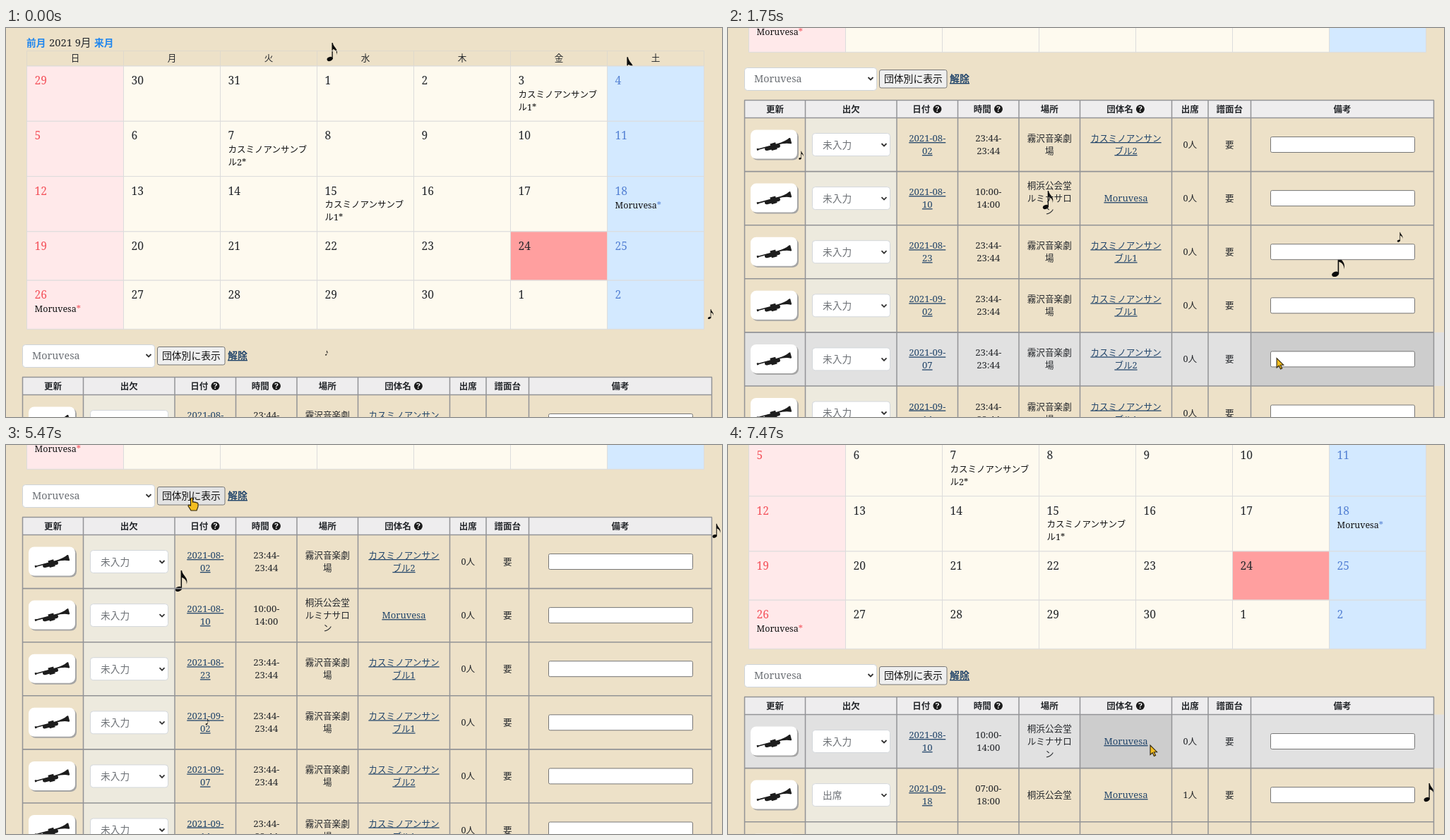
Recreate the animation shown at these times as an HTML page. Size 1014 by 552 pixels, loop 7.54 s.

```html
<!DOCTYPE html>
<html lang="ja">
<head>
<meta charset="utf-8">
<title>Calendar</title>
<style>
html, body { margin: 0; width: 100%; height: 100%; overflow: hidden; background: #ede1c8; }
svg { display: block; position: absolute; left: 0; top: 0; }
text { font-family: "Noto Serif", "Noto Sans CJK JP", "Noto Sans CJK", serif; white-space: pre; }
</style>
</head>
<body>
<svg id="stage" width="1014" height="552" viewBox="0 0 1014 552"></svg>
<script>
const LOOP = 7540, RELOAD = 5670;
const INK = '#24272b', LINK = '#23466b', LINE = '#929396', SOFT = '#6d7176';
const BAND = 'Moruvesa', ORCH = 'カスミノアンサンブル', HALL = ['霧沢音楽劇', '場'];
const SALON = ['桐浜公会堂', 'ルミナサロ', 'ン'];

function el(parent, tag, attrs, text) {
  const node = document.createElementNS('http://www.w3.org/2000/svg', tag);
  for (const k in attrs) node.setAttribute(k, attrs[k]);
  if (text !== undefined) node.textContent = text;
  parent.appendChild(node);
  return node;
}
const group = (p, attrs) => el(p, 'g', attrs);
const box = (p, x, y, width, height, fill, more) => el(p, 'rect', { x, y, width, height, fill, ...more });
const line = (p, x1, y1, x2, y2, stroke, w = 1) =>
  el(p, 'line', { x1, y1, x2, y2, stroke, 'stroke-width': w });
const path = (p, d, more) => el(p, 'path', { d, ...more });
function label(p, x, y, s, size, more) {
  const cjk = /[^\x00-\x7f]/.test(s);
  const type = cjk ? { 'font-size': size, 'font-weight': 500 } : { 'font-size': size * 1.04 };
  return el(p, 'text', { x, y, fill: INK, ...type, ...more }, s);
}
const MID = { 'text-anchor': 'middle' };
const UNDER = { fill: LINK, 'text-decoration': 'underline' };
const BOLD = { 'font-weight': 700 };
const LIGHT = { fill: SOFT, 'font-weight': 300 };

const stage = document.getElementById('stage');
const noteLayer = group(stage);
const page = group(stage);

// Calendar: weeks with events are taller
const DAY = 137;
const calX = i => 29.5 + DAY * i;
const calY = i => 54 + 78.3 * Math.min(i, 3) + 69.2 * Math.max(i - 3, 0);
const events = { 5: ORCH + '1', 9: ORCH + '2', 17: ORCH + '1', 20: BAND, 28: BAND };
const days = [];

label(page, 29, 26, '前月', 13.7, { ...BOLD, fill: '#1f86ee' });
label(page, 61, 26, '2021 9月', 14.7);
label(page, 125, 26, '来月', 13.7, { ...BOLD, fill: '#1f86ee' });
[...'日月火水木金土'].forEach((d, i) => {
  box(page, calX(i), 32.5, DAY, 21.5, 'none', { stroke: '#dfd9cc' });
  label(page, calX(i) + DAY / 2, 47, d, 12.6, MID);
});
for (let i = 0; i < 35; i++) {
  const col = i % 7, row = Math.floor(i / 7), x = calX(col), y = calY(row), h = calY(row + 1) - y;
  const fill = i === 26 ? '#ff9f9f' : col === 0 ? '#ffe9ea' : col === 6 ? '#d3e9ff' : '#fefaef';
  const ink = col === 0 ? '#f4525b' : col === 6 ? '#5481d4' : INK;
  days.push({ fill, x, y, h, rect: box(page, x, y, DAY, h, fill, { stroke: '#dcdcdc' }) });
  label(page, x + 11, y + 26, String(i < 3 ? 29 + i : (i - 3) % 30 + 1), 15, { fill: ink });
  const ev = events[i];
  if (ev === BAND) {
    el(label(page, x + 11, y + 45, ev, 12, { fill: '#111' }), 'tspan', { fill: ink }, '*');
  } else if (ev) {
    [ev.slice(0, 9), ev.slice(9) + '*'].forEach((s, k) =>
      label(page, x + 11, y + 44.5 + 18 * k, s, 12.5, { fill: '#111' }));
  }
}

// Controls
const chevron = (p, x, y) => path(p, `M${x - 3.5} ${y - 2}l3.5 3.5l3.5-3.5`,
  { fill: 'none', stroke: '#333', 'stroke-width': 1.8 });
const ring = box(page, 21.5, 447.5, 190.5, 36, 'none', { rx: 5, stroke: '#a9cdea', 'stroke-width': 3 });
const select = box(page, 23.5, 449.5, 187, 32, '#fff', { rx: 4, stroke: '#ced4da' });
label(page, 37, 470, BAND, 13.7, LIGHT);
chevron(page, 202, 465);
const button = box(page, 214.5, 452.5, 95.5, 25.5, '#efefef', { rx: 2.5, stroke: '#767676' });
label(page, 221, 469.5, '団体別に表示', 13.8, { fill: '#111', 'font-weight': 400 });
label(page, 314, 470, '解除', 14, { ...UNDER, ...BOLD });

// Table
const colX = [23.5, 109.5, 239, 325.5, 412, 498.5, 628.5, 680, 740.5, 999.5];
const mid = i => (colX[i] + colX[i + 1]) / 2;
const HEAD = 495.5, TOP = 520.5, ROW = 76.1;
const late = ['23:44-', '23:44'], early = ['10:00-', '14:00'];
const orch = n => [ORCH.slice(0, 8), ORCH.slice(8) + n];
const entry = (day, hours, hall, who, count = '0人', state = '未入力') =>
  ({ day, hours, hall, who, count, state });
const allRows = [
  entry('08-02', late, HALL, orch(2)),
  entry('08-10', early, SALON, [BAND]),
  entry('08-23', late, HALL, orch(1)),
  entry('09-02', late, HALL, orch(1)),
  entry('09-07', late, HALL, orch(2)),
  entry('09-14', late, HALL, orch(1))
];
const bandRows = [
  allRows[1],
  entry('09-18', ['07:00-', '18:00'], [SALON[0]], [BAND], '1人', '出席'),
  entry('09-26', early, [SALON[0]], [BAND])
];

function lines(p, col, y, list, more) {
  list.forEach((s, i) =>
    label(p, mid(col), y + 42.5 + (i - (list.length - 1) / 2) * 18, s, 12.6, { ...MID, ...more }));
}
function trumpet(p, x, y) {
  const g = group(p, { transform: `translate(${x} ${y}) rotate(-15)`, fill: '#1d1d1d' });
  path(g, 'M-25-1.2h2.5v.6h27q13 0 19-3.4l1.5.3v8l-1.5.3q-6-3.6-19-3.6h-27v.6h-2.5z');
  path(g, 'M-13 0h20q3 3 0 5.4h-18q-5-.8-2-5.4zM-5-3h8v10h-8z');
}
function buildTable(rows) {
  const g = group(page), bottom = TOP + ROW * rows.length;
  const hoverBack = box(g, 24, 0, 990, ROW, '#e1e1e1');
  box(g, colX[0], HEAD, 976, TOP - HEAD, '#eeedee');
  const states = rows.map((r, i) => box(g, colX[1], TOP + ROW * i, colX[2] - colX[1], ROW, '#edeade'));
  const hoverCell = box(g, 0, 0, 10, ROW, '#cdcdcd');
  ['更新', '出欠', '日付?', '時間?', '場所', '団体名?', '出席', '譜面台', '備考'].forEach((s, i) => {
    const name = s.replace('?', ''), help = name !== s;
    const x = mid(i) - (help ? 8.5 : 0);
    label(g, x, 512.5, name, 12.5, { ...MID, ...BOLD });
    if (!help) return;
    const cx = x + name.length * 6.2 + 10.3;
    el(g, 'circle', { cx, cy: 508, r: 6, fill: '#1b1b1b' });
    label(g, cx, 511.9, '?', 10.5, { ...MID, ...BOLD, fill: '#fff' });
  });
  rows.forEach((r, i) => {
    const y = TOP + ROW * i;
    box(g, 34, y + 19, 66, 41, '#a5a5a5', { rx: 8 });
    box(g, 32, y + 17, 66, 41, '#fff', { rx: 8 });
    trumpet(g, 65, y + 38.5);
    box(g, 119.5, y + 22, 110, 32, '#fff', { rx: 4, stroke: '#d3d7db' });
    label(g, 134, y + 43, r.state, 13.7, LIGHT);
    chevron(g, 221, y + 38.5);
    lines(g, 2, y, ['2021-' + r.day.slice(0, 3), r.day.slice(3)], UNDER);
    lines(g, 3, y, r.hours);
    lines(g, 4, y, r.hall);
    lines(g, 5, y, r.who, UNDER);
    lines(g, 6, y, [r.count]);
    lines(g, 7, y, ['要']);
    box(g, 768.5, y + 27, 204, 22, '#fff', { rx: 2, stroke: '#767676' });
  });
  for (const x of colX) line(g, x, HEAD, x, bottom, LINE, 1.5);
  line(g, 23, HEAD, 1000, HEAD, LINE, 1.5);
  for (let i = 0; i <= rows.length; i++) line(g, 23, TOP + ROW * i, 1000, TOP + ROW * i, LINE, 1.6);
  return { g, hoverBack, hoverCell, states };
}
const tables = [buildTable(allRows), buildTable(bandRows)];

// Open list of the select
const menu = group(page);
box(menu, 25, 484, 187, 73, '#000', { opacity: .15 });
box(menu, 23.5, 482, 186.5, 72, '#fff', { stroke: '#666' });
box(menu, 24, 482.5, 185.5, 18, '#1e90ff');
[BAND, 'orla-fen', ORCH + '1', ORCH + '2'].forEach((s, i) =>
  label(menu, 37, 495 + i * 17.6, s, 13.9, { ...LIGHT, fill: i ? '#4d5156' : '#fff' }));

// Falling notes: size, a moment, the place then, speed in px/s, pull
const notes = [
  [32, 0, 880, 57, -9, 125, 20],
  [28, 750, 383, 391, -60, 185],
  [26, 0, 462, 34, -5, 120],
  [14, 0, 998, 406, -4, 65, 20],
  [7, 0, 454, 461, 30, 95],
  [12, 2710, 95, 363, -9, 190],
  [14, 2710, 943, 385, -9, 92],
  [30, 4380, 258, 73, -9, 110],
  [9, 4380, 271, 229, 13, 150],
  [20, 4380, 1004, -20, 2, 130],
  [26, 7470, 993, 493, 18, 120]
].map(([size, time, x, y, vx, vy, pull = 0]) => {
  const g = group(noteLayer);
  const n = group(g, { transform: `scale(${size})`, fill: '#0b0b0b' });
  el(n, 'ellipse', { cx: -.13, cy: .38, rx: .16, ry: .11, transform: 'rotate(-20 -.13 .38)' });
  path(n, 'M-.02 .38V-.5H.03C.06-.24 .36-.18 .25 .16C.27-.03 .16-.13 .03-.17V.38Z');
  return { g, time, x, y, vx, vy, pull };
});

// Pointers
const YELLOW = { fill: '#f4be20', stroke: '#2d2410', 'stroke-width': 1.1 };
const arrow = path(stage, 'M0 0V13.5L3.2 10.6L5.4 15.4L7.6 14.4L5.4 9.7H9.6Z', YELLOW);
const hand = path(stage,
  'M-1.5 1Q0-1 1.5 1V6Q3 5 4.2 6.4Q5.6 5.6 6.6 7Q8.5 6.4 9 8.5V12.5L7 18H-1L-5 11.5Q-5 9-1.5 11Z', YELLOW);

// Smooth 0 to 1 over a span of time
function ramp(t, from, span) {
  const k = Math.min(1, Math.max(0, (t - from) / span));
  return k * k * (3 - 2 * k);
}
const scrollAt = t => t < RELOAD
  ? 297 * ramp(t, 80, 480) + 96 * ramp(t, 880, 160)
  : 42 + 96 * ramp(t, 6290, 160);

// Pointer moves: start, span, goal
const moves = [[1680, 740, 141, 73], [3950, 300, 263, 75], [5870, 210, 276, 81], [6680, 620, 598, 426]];
const cursorAt = t => moves.reduce(([x, y], [from, span, gx, gy]) => {
  const k = ramp(t, from, span);
  return [x + (gx - x) * k, y + (gy - y) * k];
}, [794, 479]);

const show = (node, on) => node.setAttribute('visibility', on ? 'visible' : 'hidden');
const move = (node, x, y) => node.setAttribute('transform', `translate(${x.toFixed(2)} ${y.toFixed(2)})`);

function draw(t) {
  const scroll = scrollAt(t), [cx, cy] = cursorAt(t), py = cy + scroll;
  const reloaded = t >= RELOAD;
  move(page, 0, -scroll);

  for (const n of notes) {
    const s = (t - n.time) / 1000;
    show(n.g, reloaded === n.time >= RELOAD);
    move(n.g, n.x + n.vx * s, n.y + n.vy * s + n.pull * s * s);
  }

  // Hover only follows pointer moves, not scrolling
  const hovering = t > 1680 && t < 2450 || t >= 5870 && t < 6290 || t >= 6680;
  for (const d of days) {
    const on = hovering && cx >= d.x && cx < d.x + DAY && py >= d.y && py < d.y + d.h;
    d.rect.setAttribute('fill', on ? '#ffff88' : d.fill);
  }
  const row = Math.floor((py - TOP) / ROW);
  const col = colX.findIndex((x, j) => cx >= x && cx < colX[j + 1]);
  tables.forEach((tb, i) => {
    const active = reloaded === (i === 1);
    const on = active && hovering && row in tb.states && col >= 0;
    tb.g.setAttribute('display', active ? 'inline' : 'none');
    tb.states.forEach((s, j) => s.setAttribute('fill', on && j === row ? '#e1e1e1' : '#edeade'));
    show(tb.hoverBack, on);
    show(tb.hoverCell, on);
    if (!on) return;
    for (const r of [tb.hoverBack, tb.hoverCell]) r.setAttribute('y', TOP + ROW * row);
    tb.hoverCell.setAttribute('x', colX[col]);
    tb.hoverCell.setAttribute('width', colX[col + 1] - colX[col]);
  });

  const open = t >= 2850 && t < 4900;
  show(menu, open);
  show(ring, open);
  select.setAttribute('stroke', open ? '#80bdff' : '#ced4da');
  const onButton = !reloaded && cx > 214 && cx < 310 && py > 452 && py < 478;
  button.setAttribute('fill', onButton ? '#e3e3e3' : '#efefef');
  show(hand, onButton);
  show(arrow, !onButton && t >= 70);
  move(hand, cx, cy);
  move(arrow, cx, cy);
}

const start = performance.now();
function tick() {
  draw((performance.now() - start) % LOOP);
  requestAnimationFrame(tick);
}
tick();
</script>
</body>
</html>
```
